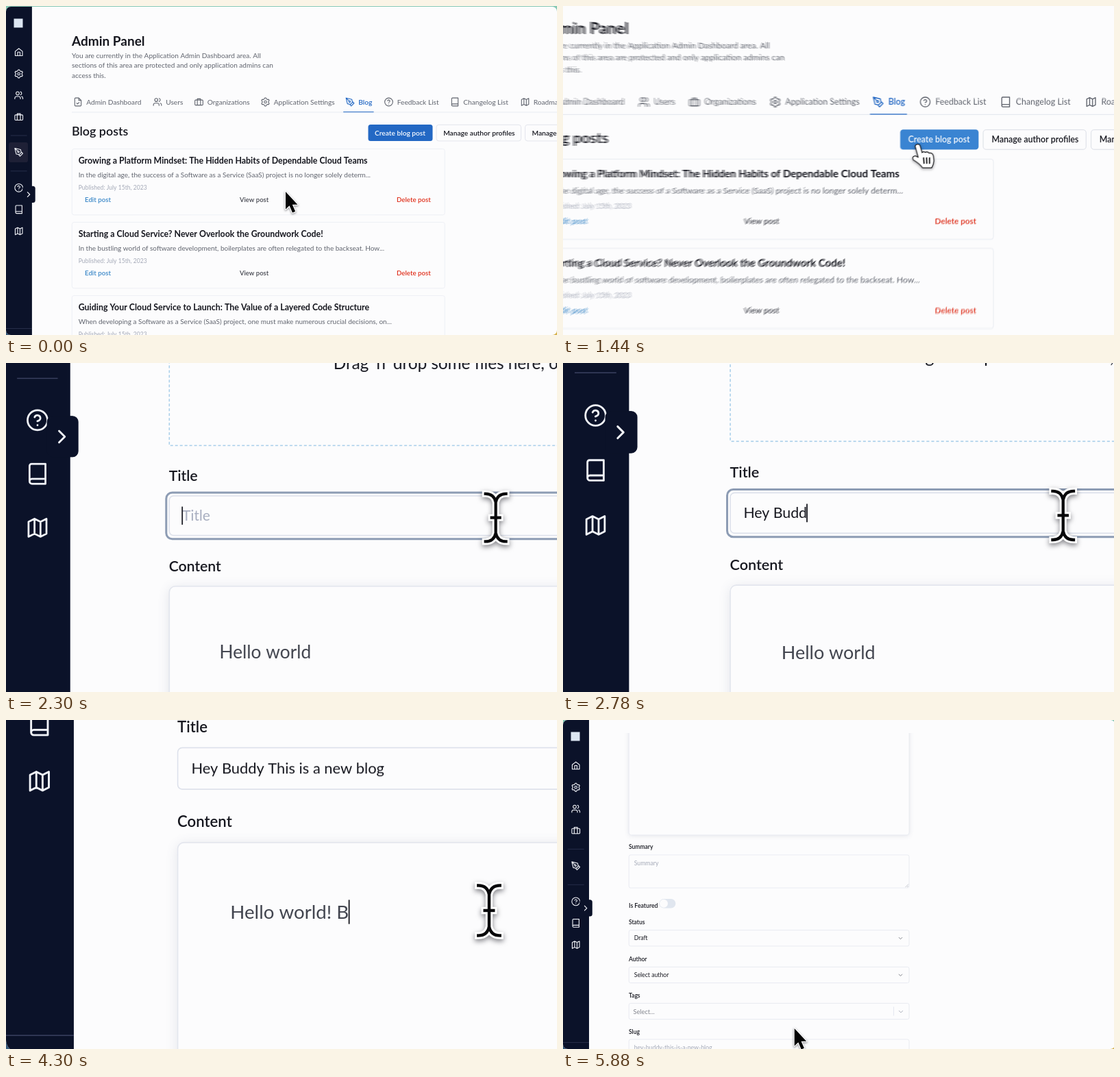
An HTML page with a canvas for the animation above (5.9 s loop, 804 by 480 pixels).

```html
<!DOCTYPE html>
<html lang="en">
<head>
<meta charset="utf-8">
<title>Admin panel demo</title>
<style>
html, body { margin: 0; width: 100%; height: 100%; overflow: hidden; background: #fcfcfd; }
canvas { display: block; }
</style>
</head>
<body>
<canvas id="stage" width="804" height="480"></canvas>
<script>
const W = 804, H = 480, LOOP = 5900;
const FORM_AT = 1560, CONTENT_FOCUS = 3950;
const SCROLL = 532, EDITOR_TOP = 362.7, EDITOR_END = 700;
const PAPER = '#fcfcfd', SIDE = '#0b1229', INK = '#16171f', GREY = '#60646e';
const PALE = '#a5aab8', LINE = '#dde1eb', BLUE = '#2368c4', RED = '#e0301c';
const SIDE_LINE = '#3a4060', WHITE = '#f2f4f9';

const stage = document.getElementById('stage').getContext('2d');
const buffer = document.createElement('canvas');
buffer.width = W;
buffer.height = H;
const c = buffer.getContext('2d');

// ---- motion ----
// Every key is [time, ...values]; each change follows a critically damped spring.
const CAMERA = [
  [0, 1, 0, 0],
  [260, 1.9, -627.3, -125.6],
  [1085, 1, 0, 0],
  [1640, 2.545, 0, -599],
  [3650, 2.613, 0, -775],
  [4720, 1, 0, 0]
];
const POINTER = [
  [0, 408, 271],
  [100, 549.5, 191.5],
  [1520, 287, 322.7],
  [3600, 270, 401],
  [4850, 337, 450]
];
const PAGE = [[0, 0], [4950, SCROLL]];

function spring(ms, rate) {
  const x = Math.max(0, ms) * rate / 1000;
  return 1 - (1 + x) * Math.exp(-x);
}

function follow(keys, t, rate) {
  const out = keys[0].slice(1);
  for (let k = 1; k < keys.length; k++) {
    const p = spring(t - keys[k][0], rate);
    out.forEach((_, i) => out[i] += (keys[k][i + 1] - keys[k - 1][i + 1]) * p);
  }
  return out;
}

const typed = (t, start, step, max) =>
  Math.max(0, Math.min(max, Math.floor((t - start) / step)));

function titleText(t) {
  const base = 'Hey Buddy This is a new b';
  return t < 3620
    ? (base + 'o').slice(0, typed(t, 2400, 43, 26))
    : base + 'log'.slice(0, typed(t, 3620, 50, 3));
}

const contentText = t => 'Hello world' + '! Blog post'.slice(0, typed(t, 4080, 65, 11));

// ---- drawing helpers ----
function text(str, x, y, size, color = INK, weight = 400, align = 'left') {
  c.font = `${weight} ${size}px Lato, Inter, sans-serif`;
  c.textAlign = align;
  c.fillStyle = color;
  c.fillText(str, x, y + size * 0.35);
}

function box(x, y, w, h, r, fill, stroke, width = 0.7) {
  c.beginPath();
  c.roundRect(x, y, w, h, r);
  if (fill) { c.fillStyle = fill; c.fill(); }
  if (stroke) { c.strokeStyle = stroke; c.lineWidth = width; c.stroke(); }
}

function line(x1, y1, x2, y2, color, width = 0.7) {
  c.strokeStyle = color;
  c.lineWidth = width;
  c.beginPath();
  c.moveTo(x1, y1);
  c.lineTo(x2, y2);
  c.stroke();
}

function gearPath() {
  let d = 'M9 12a3 3 0 1 0 6 0a3 3 0 1 0-6 0';
  for (let i = 0; i < 24; i++) {
    const a = (i - 0.5) * Math.PI / 12 - Math.PI / 2;
    const r = i % 4 < 2 ? 10.3 : 7.8;
    d += (i ? 'L' : 'M') + (12 + r * Math.cos(a)) + ' ' + (12 + r * Math.sin(a));
  }
  return d + 'Z';
}

const ICONS = {
  home: 'M3 10l9-7 9 7v11H3zM9 21v-9h6v9',
  gear: gearPath(),
  users: 'M16 21v-2a4 4 0 0 0-4-4H6a4 4 0 0 0-4 4v2M22 21v-2a4 4 0 0 0-3-3.9M16 3.1a4 4 0 0 1 0 7.8M5 7a4 4 0 1 0 8 0a4 4 0 1 0-8 0',
  bag: 'M4 7h16a2 2 0 0 1 2 2v9a2 2 0 0 1-2 2H4a2 2 0 0 1-2-2V9a2 2 0 0 1 2-2zM8 20V4h8v16',
  pen: 'M12 19l7-7 3 3-7 7zM18 13l-1.5-7.5L2 2l3.5 14.5L13 18l5-5zM2 2l7.6 7.6M9 11a2 2 0 1 0 4 0a2 2 0 1 0-4 0',
  help: 'M2 12a10 10 0 1 0 20 0a10 10 0 1 0-20 0M9.1 9a3 3 0 0 1 5.8 1c0 2-3 3-3 3M12 17v.1',
  book: 'M4 19.5V4a2 2 0 0 1 2-2h14v20H6.5a2.5 2.5 0 0 1 0-5H20',
  map: 'M3 6l6-3 6 3 6-3v15l-6 3-6-3-6 3zM9 3v15M15 6v15',
  file: 'M14 2H6a2 2 0 0 0-2 2v16a2 2 0 0 0 2 2h12a2 2 0 0 0 2-2V8zM14 2v6h6M9 15l2 2 4-4',
  right: 'M9 5l7 7-7 7',
  down: 'M5 9l7 7 7-7'
};
for (const k in ICONS) ICONS[k] = new Path2D(ICONS[k]);

function icon(name, x, y, color, size = 14, width = 1.9) {
  c.save();
  c.translate(x - size / 2, y - size / 2);
  c.scale(size / 24, size / 24);
  c.lineCap = c.lineJoin = 'round';
  c.strokeStyle = color;
  c.lineWidth = width;
  c.stroke(ICONS[name]);
  c.restore();
}

// ---- page parts ----
function sidebar(onForm) {
  c.fillStyle = SIDE;
  c.fillRect(0, 0, 37.9, H);
  box(11.5, 18.5, 13, 13, 0, '#dce6f2');
  if (!onForm) box(4, 199, 28, 29, 3, '#1e2036');
  const items = { home: 67.3, gear: 99, users: 130.3, bag: 161.8, pen: 213.3, help: 265.3, book: 296.8, map: 328.4 };
  for (const k in items) icon(k, 18.7, items[k], WHITE);
  for (const y of [189, 240.8]) line(6.7, y, 30.6, y, SIDE_LINE, 0.6);
  line(0, 470.5, 37.9, 470.5, SIDE_LINE, 0.6);
  box(24.2, 262.8, 18.5, 24.2, 3.5, SIDE);
  icon('right', 32.8, 275, WHITE, 11.5, 2.4);
}

const NAV = [
  ['file', 105, 'Admin Dashboard'], ['users', 221, 'Users'], ['bag', 281.5, 'Organizations'],
  ['gear', 378.5, 'Application Settings'], ['pen', 502, 'Blog'], ['help', 558.5, 'Feedback List'],
  ['book', 655, 'Changelog List'], ['map', 757.5, 'Roadmap']
];

function header() {
  text('Admin Panel', 96, 51.5, 19, INK, 700);
  ['You are currently in the Application Admin Dashboard area. All',
   'sections of this area are protected and only application admins can',
   'access this.'].forEach((s, i) => text(s, 96, 72 + i * 14.5, 10.1, GREY));
  line(96, 155, W, 155, '#e0e4ec');
  for (const [name, x, label] of NAV) {
    const color = name === 'pen' ? BLUE : GREY;
    icon(name, x, 140, color);
    text(label, x + 12.2, 140, 10.2, color, name === 'pen' ? 600 : 400);
  }
  line(492.2, 154.6, 536.6, 154.6, BLUE, 1);
}

const POSTS = [
  ['Growing a Platform Mindset: The Hidden Habits of Dependable Cloud Teams',
   'In the digital age, the success of a Software as a Service (SaaS) project is no longer solely determ...'],
  ['Starting a Cloud Service? Never Overlook the Groundwork Code!',
   'In the bustling world of software development, boilerplates are often relegated to the backseat. How...'],
  ['Guiding Your Cloud Service to Launch: The Value of a Layered Code Structure',
   'When developing a Software as a Service (SaaS) project, one must make numerous crucial decisions, on...']
];

function listPage(hover) {
  header();
  text('Blog posts', 96, 183, 17.9, INK, 600);
  box(528.5, 173, 94, 24, 3.5, hover ? '#3a84d2' : BLUE);
  text('Create blog post', 538, 185, 10.2, '#fafcff', 600);
  box(628, 173.3, 123.5, 23.6, 3.5, PAPER, '#d8dce6');
  text('Manage author profiles', 638.2, 185, 10.2, INK, 600);
  box(757.5, 173.3, 104, 23.6, 3.5, PAPER, '#d8dce6');
  text('Manage categories', 767.5, 185, 10.2, INK, 600);
  POSTS.forEach(([title, body], i) => {
    const y = i * 107;
    box(96.3, 208.5 + y, 544, 96.3, 3, null, '#e8ebf2');
    text(title, 105.7, 226 + y, 12.4, INK, 700);
    text(body, 105.7, 246.3 + y, 10, GREY);
    text('Published: July 15th, 2023', 105.7, 264.8 + y, 8.6, PALE);
    text('Edit post', 115, 283 + y, 9.7, '#3b88c8', 600);
    text('View post', 341, 283 + y, 9.5, '#44464f', 600);
    text('Delete post', 570, 283 + y, 9.7, RED, 600);
  });
}

function caret(x, y, h) {
  line(x, y - h / 2, x, y + h / 2, INK, 0.7);
}

function formPage(t, zoom) {
  header();
  c.setLineDash([1.6, 1.2]);
  box(96, 184, 408, 96.2, 0, null, '#a9cfea', 0.6);
  c.setLineDash([]);
  text("Drag 'n' drop some files here, or click to select files", 300, 232, 9.75, INK, 400, 'center');

  const label = (s, y) => text(s, 95.8, y, 8.5, INK, 600);
  const field = (y, h = 23.2) => box(96, y, 408, h, 2.5, PAPER, LINE, 0.6);

  label('Title', 298);
  const onTitle = t > 2000 && t < CONTENT_FOCUS;
  if (onTitle) box(94.2, 307.8, 411.6, 27.2, 3.5, null, '#8d9cb4', 1.2);
  field(309.7);
  const title = titleText(t);
  text(title || 'Title', 103.6, 321.3, 8.4, title ? INK : '#a8aec0');
  if (onTitle) caret(103.6 + (title ? c.measureText(title).width : 0), 321.3, 10.6);

  label('Content', 351);
  c.save();
  c.shadowColor = 'rgba(90,100,130,.16)';
  c.shadowBlur = 7 * zoom;
  c.shadowOffsetY = zoom;
  box(96, EDITOR_TOP, 408, EDITOR_END - EDITOR_TOP, 3.5, PAPER);
  c.restore();
  box(96, EDITOR_TOP, 408, EDITOR_END - EDITOR_TOP, 3.5, null, '#e3e6ee', 0.6);
  const content = contentText(t);
  text(content, 125.4, 401.5, 10.6, '#42454f');
  if (t >= CONTENT_FOCUS) caret(125.6 + c.measureText(content).width, 401.5, 13.5);

  // Lower half, placed relative to the fully scrolled page
  c.translate(0, SCROLL);
  label('Summary', 185.5);
  field(197, 48);
  text('Summary', 103.5, 209, 8.7, PALE);
  line(498.5, 244, 503, 239.5, PALE, 0.6);
  line(501, 244, 503, 242, PALE, 0.6);
  text('Is Featured', 95.8, 270.5, 8.7, INK, 600);
  box(140, 261, 24, 13.5, 6.75, '#e0e6ef');
  box(140.7, 261.7, 12, 12, 6, PAPER);
  const select = (name, value, y) => {
    label(name, y - 23);
    field(y - 11.7);
    text(value, 103.5, y, 8.7);
    icon('down', 491.5, y, GREY, 8, 2.2);
  };
  select('Status', 'Draft', 318.2);
  select('Author', 'Select author', 371.8);
  label('Tags', 402);
  field(413);
  text('Select...', 102.3, 425, 9.2, '#80838c');
  line(481.5, 418, 481.5, 431, LINE);
  icon('down', 492, 425, PALE, 9, 2.4);
  label('Slug', 454.5);
  field(465.5);
  text('hey-buddy-this-is-a-new-blog', 103.5, 477.5, 8.7, PALE);
}

// ---- pointer ----
const ARROW = new Path2D('M0 0V25.5L5.6 20.3 10 30.5 14.2 28.8 9.8 18.8H17.5Z');
const HAND = new Path2D('M-2.5 2C-3-.8 1.8-1.3 2.5 1.3L5 10Q6.8 7.6 9 9.5 11.5 7.8 13.4 10.3 17.4 9.4 18.4 13.6L19 19Q18.6 23.5 16.5 27H6Q3 22.5-5 17.6-6.8 14-3 13.6L1.2 15.6Z');
const FINGERS = new Path2D('M7 15.5l.6 6.5M10.6 15.5l.3 6.5M14.2 15.5v6.5');
const BEAM = new Path2D('M-6-14Q-1-14 0-9 1-14 6-14M0-9V9M-6 14Q-1 14 0 9 1 14 6 14M-2.4 0H2.4');

function pointerKind(x, y, onForm, scroll) {
  if (!onForm) return x > 528 && x < 622 && y > 173 && y < 197 ? 'hand' : 'arrow';
  const py = y + scroll;
  const overField = (py > 309 && py < 334) || (py > EDITOR_TOP && py < EDITOR_END);
  return x > 96 && x < 504 && overField ? 'beam' : 'arrow';
}

function pointer(kind, x, y, zoom) {
  c.save();
  c.translate(x, y);
  c.lineJoin = c.lineCap = 'round';
  const shade = on => {
    c.shadowColor = on ? 'rgba(20,20,30,.5)' : 'transparent';
    c.shadowBlur = 3 * zoom;
    c.shadowOffsetY = 1.2 * zoom;
  };
  const stroke = (path, color, width) => {
    c.strokeStyle = color;
    c.lineWidth = width;
    c.stroke(path);
  };
  shade(true);
  if (kind === 'beam') {
    c.lineCap = 'square';
    stroke(BEAM, '#fff', 4);
    shade(false);
    stroke(BEAM, '#08080a', 1.7);
  } else if (kind === 'hand') {
    stroke(HAND, '#08080a', 1.8);
    shade(false);
    c.fillStyle = '#fff';
    c.fill(HAND);
    stroke(FINGERS, '#08080a', 1.4);
  } else {
    stroke(ARROW, '#fff', 2.4);
    shade(false);
    c.fillStyle = '#040405';
    c.fill(ARROW);
  }
  c.restore();
}

// ---- one picture: things move with t, the page shows its state at now ----
function scene(t, now) {
  const [zoom, tx, ty] = follow(CAMERA, t, 7.7);
  const [px, py] = follow(POINTER, t, 11);
  const [scroll] = follow(PAGE, t, 10);
  const onForm = now >= FORM_AT;
  const kind = pointerKind(px, py, onForm, scroll);

  c.setTransform(zoom, 0, 0, zoom, tx, ty);
  const wall = c.createLinearGradient(0, 0, W, 0);
  wall.addColorStop(0, '#36597a');
  wall.addColorStop(0.9, '#4d7f98');
  wall.addColorStop(1, '#d8b24a');
  c.fillStyle = wall;
  c.fillRect(0, 0, W, H);
  c.fillStyle = '#86c8b4';
  c.fillRect(0, 0, W, 9);

  c.save();
  c.beginPath();
  c.roundRect(0, 1, W, H - 1, 7);
  c.clip();
  c.fillStyle = PAPER;
  c.fillRect(0, 0, W, H);
  c.save();
  c.beginPath();
  c.rect(37, 20, W, H);
  c.clip();
  c.translate(0, -scroll);
  if (onForm) formPage(now, zoom);
  else listPage(kind === 'hand');
  c.restore();
  sidebar(onForm);
  c.restore();
  pointer(kind, px, py, zoom);
}

// Motion blur: the mean of a few moments within a short shutter time
function render(now) {
  for (let i = 0; i < 5; i++) {
    scene(Math.max(0, now + (i - 2) * 2), now);
    stage.globalAlpha = 1 / (i + 1);
    stage.drawImage(buffer, 0, 0);
  }
}

const start = performance.now();
function frame() {
  render((performance.now() - start) % LOOP);
  requestAnimationFrame(frame);
}
frame();
</script>
</body>
</html>
```
